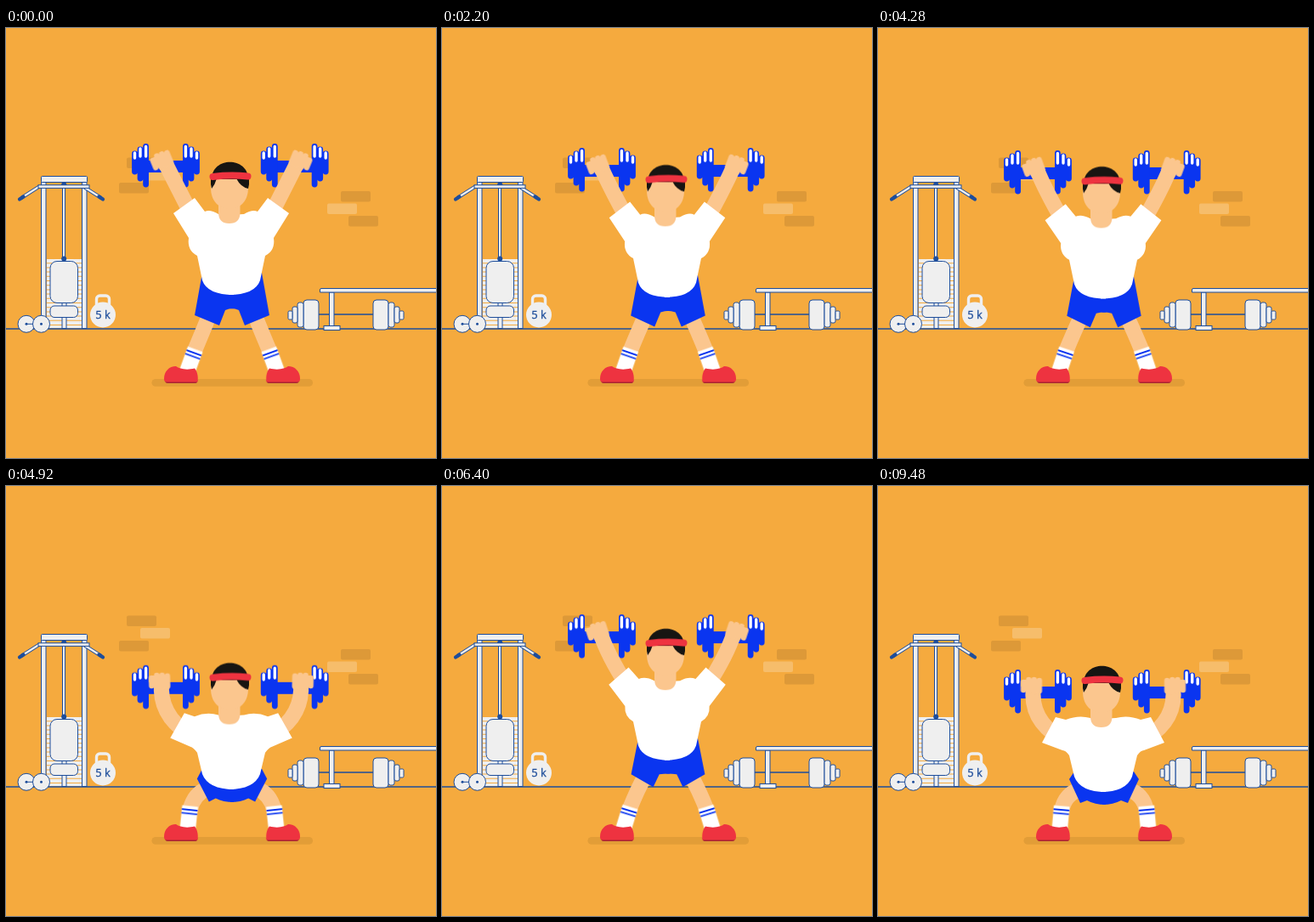
Write an HTML page without scripts that moves like this. It is 506 px wide and 506 px high and loops after 9960 ms.

```html
<!DOCTYPE html>
<html lang="en">
<head>
<meta charset="utf-8">
<title>Dumbbell squats</title>
<style>
  html, body { margin: 0; width: 100%; height: 100%; overflow: hidden; background: #f5aa3e; }
  svg { display: block; width: 100vw; height: 100vh; }

  .gear { fill: #efefef; stroke: #1d4d9b; stroke-width: 1; }
  .line { fill: none; stroke: #1d4d9b; stroke-width: 1.6; }
  .pale { fill: #efefef; }
  .navy { fill: #1d4d9b; }
  .dark { fill: #dd9938; }
  .light { fill: #f6bd6b; }
  .blue { fill: #0a35f0; }
  .skin { fill: #fbc68e; }
  .limb { fill: none; stroke: #fbc68e; stroke-width: 18; }
  .white { fill: #fff; }
  .red { fill: #ee3340; }
  .hair { fill: #171512; }
  .label { font: 13px "Open Sans", "Noto Sans", sans-serif; text-anchor: middle; stroke: #1d4d9b; stroke-width: .3; }

  /* Three and a half squats, then a rest at the bottom. */
  .move { animation: 9960ms cubic-bezier(.37, 0, .63, 1) infinite; }
  .lift { animation-name: lift; }
  .head { animation-name: head; }
  .fist { animation-name: fist; }
  .arm { animation-name: arm; }
  .shirt { animation-name: shirt; }
  .shorts { animation-name: shorts; }
  .leg { animation-name: leg; }
  .sock { animation-name: sock; transform-origin: 214px 402px; }

  @keyframes lift {
    0%, 20.44%, 40.88%, 61.33% { transform: translateY(0); }
    10.22%, 30.66%, 51.1%, 71.55%, 100% { transform: translateY(80px); }
  }
  @keyframes head {
    0%, 20.44%, 40.88%, 61.33% { transform: translateY(0); }
    10.22%, 30.66%, 51.1%, 71.55%, 100% { transform: translateY(54px); }
  }
  @keyframes fist {
    0%, 20.44%, 40.88%, 61.33% { transform: translate(183px, 156px) rotate(-22deg); }
    10.22%, 30.66%, 51.1%, 71.55%, 100% { transform: translate(180.5px, 235px) rotate(0deg); }
  }
  @keyframes arm {
    0%, 20.44%, 40.88%, 61.33% { d: path("M187 158Q199 182 219 221"); }
    10.22%, 30.66%, 51.1%, 71.55%, 100% { d: path("M183 236Q178 275 215 297"); }
  }
  @keyframes shirt {
    0%, 20.44%, 40.88%, 61.33% {
      d: path("M268 220L250 219Q240 213 234 216L222 200L197 218L215 247Q213 262 225 268L231 297Q237 314 268 314Z");
    }
    10.22%, 30.66%, 51.1%, 71.55%, 100% {
      d: path("M268 274L250 273Q236 269 221 275L209 272L193 302L217 311Q221 311 225 317L231 342Q238 360 268 360Z");
    }
  }
  @keyframes shorts {
    0%, 20.44%, 40.88%, 61.33% { d: path("M268 290L231 288L222 338L251 350L258 332Q262 330 268 330Z"); }
    10.22%, 30.66%, 51.1%, 71.55%, 100% { d: path("M268 340L231 336L225 345L238 373L246 370Q255 375 268 375Z"); }
  }
  @keyframes leg {
    0%, 20.44%, 40.88%, 61.33% { d: path("M240 336Q232 356 221 382"); }
    10.22%, 30.66%, 51.1%, 71.55%, 100% { d: path("M238 357Q220 362 216 382"); }
  }
  @keyframes sock {
    0%, 20.44%, 40.88%, 61.33% { transform: rotate(20deg); }
    10.22%, 30.66%, 51.1%, 71.55%, 100% { transform: rotate(5deg); }
  }
</style>
</head>
<body>
<svg viewBox="0 0 506 506">
  <defs>
    <rect id="brick" width="35" height="12.5" rx="2"/>

    <g id="plates">
      <path d="M151.5 148V169M158 143V177M164.6 139.5V184" stroke="#0a35f0" stroke-width="6.8" stroke-linecap="round"/>
      <path d="M151.5 147V153M158 142V151M164.6 139.5V151" stroke="#fff" stroke-width="3.4" stroke-linecap="round"/>
    </g>
    <g id="dumbbell">
      <rect class="blue" x="165" y="156" width="46" height="14"/>
      <use href="#plates"/>
      <use href="#plates" transform="translate(376) scale(-1 1)"/>
    </g>

    <g id="hand">
      <rect class="skin" x="-9" y="-7" width="20" height="13"/>
      <path d="M-9.4-4V5M-3.1-7V7M3.2-7V7M9.4-6V6" stroke="#fbc68e" stroke-width="6.4" stroke-linecap="round"/>
    </g>
    <g id="stocking">
      <rect class="white" x="204.7" y="376.5" width="18.6" height="28"/>
      <path d="M204.7 381H223.3M204.7 385.3H223.3" stroke="#0a35f0" stroke-width="1.8"/>
    </g>
    <g id="shoe">
      <path fill="#a92532" d="M187 414H225.3Q225.5 418 223 418H190Q187 418 187 414Z"/>
      <path class="red" d="M186 413C186 404 192 398 200 398C204 401 212 403 222 400.5C225 404 226.5 410 225.5 416.5H189Q186 416.5 186 413Z"/>
    </g>

    <g id="weights">
      <rect x="350" y="320" width="18" height="35" rx="4"/>
      <rect x="343" y="323" width="7" height="29" rx="2.5"/>
      <rect x="337" y="328" width="6" height="19" rx="2"/>
      <rect x="332" y="333" width="5" height="10" rx="1.5"/>
    </g>

    <g id="handle">
      <path d="M40 186L18 200" stroke="#1d4d9b" stroke-width="4.2"/>
      <path d="M40 186L21 198" stroke="#efefef" stroke-width="2.4"/>
      <path d="M20.5 198.5L16 201.5" stroke="#1d4d9b" stroke-width="4.2" stroke-linecap="round"/>
    </g>
  </defs>

  <rect width="506" height="506" fill="#f5aa3e"/>

  <g class="dark">
    <use href="#brick" x="142" y="152.5"/>
    <use href="#brick" x="133" y="182"/>
    <use href="#brick" x="394" y="192"/>
    <use href="#brick" x="403" y="221"/>
  </g>
  <g class="light">
    <use href="#brick" x="158" y="167"/>
    <use href="#brick" x="378" y="206.5"/>
  </g>

  <path class="line" d="M0 354H506"/>

  <!-- Pulldown machine -->
  <path d="M68.5 272V353" stroke="#efefef" stroke-width="41" stroke-dasharray="4.2 1"/>
  <g class="gear">
    <rect x="41.5" y="181" width="5.5" height="172.5"/>
    <rect x="89.5" y="181" width="5.5" height="172.5"/>
    <rect x="41.5" y="174.5" width="54" height="7" rx="1"/>
    <rect x="66.5" y="184" width="3" height="88"/>
    <use href="#handle"/>
    <use href="#handle" transform="translate(130) scale(-1 1)"/>
    <rect x="38" y="184.8" width="60" height="3.6"/>
    <rect x="66" y="323" width="5" height="30.5"/>
    <rect x="52" y="274.5" width="32.5" height="49" rx="8"/>
    <rect x="52" y="327" width="32.5" height="13.5" rx="5"/>
  </g>
  <g class="navy">
    <path d="M65 184.8A3.2 3.2 0 0 1 71.4 184.8Z"/>
    <circle cx="68.2" cy="271.5" r="3"/>
  </g>

  <!-- Small weights and kettlebell -->
  <g class="gear">
    <circle cx="24" cy="348.3" r="10"/>
    <circle cx="41.5" cy="348.3" r="10"/>
    <path d="M24 348.3H32"/>
  </g>
  <g class="navy">
    <circle cx="24" cy="348.3" r="1.5"/>
    <circle cx="41.5" cy="348.3" r="1.5"/>
  </g>
  <rect x="106.5" y="315" width="15" height="16" rx="4" fill="none" stroke="#efefef" stroke-width="3.4"/>
  <circle class="pale" cx="114" cy="337.5" r="15"/>
  <text class="label navy" x="114" y="342.3">5 k</text>

  <!-- Barbell and bench -->
  <path class="line" d="M368 337H432"/>
  <g class="gear">
    <use href="#weights"/>
    <use href="#weights" transform="translate(800) scale(-1 1)"/>
    <rect x="380.5" y="311" width="5.5" height="39.5"/>
    <rect x="374" y="350.5" width="19" height="5"/>
    <path d="M371 306.5H510V311H369.5V308Q369.5 306.5 371 306.5Z"/>
  </g>

  <!-- Athlete: each side is drawn as a left half, the right one mirrored -->
  <rect x="171.5" y="413" width="189.5" height="8.8" rx="4.4" fill="#e29d37"/>
  <g>
    <path class="move leg limb"/>
    <g class="move sock"><use href="#stocking"/></g>
    <use href="#shoe"/>
    <path class="move shorts blue"/>
  </g>
  <g transform="translate(532) scale(-1 1)">
    <path class="move leg limb"/>
    <g class="move sock"><use href="#stocking"/></g>
    <use href="#shoe"/>
    <path class="move shorts blue"/>
  </g>
  <g class="move lift">
    <use href="#dumbbell"/>
    <use href="#dumbbell" x="151.7"/>
  </g>
  <g>
    <path class="move arm limb"/>
    <g class="move fist"><use href="#hand"/></g>
    <path class="move shirt white"/>
  </g>
  <g transform="translate(530) scale(-1 1)">
    <path class="move arm limb"/>
    <g class="move fist"><use href="#hand"/></g>
    <path class="move shirt white"/>
  </g>
  <g class="move head">
    <path class="skin" d="M250 200H275.5V217Q275.5 230 262.7 230Q250 230 250 217Z"/>
    <path class="skin" d="M241 176H285V188C285 204 275 213 263 213C251 213 241 204 241 188Z"/>
    <path class="hair" d="M242 178C242 151 285 151 285 178Z"/>
    <path class="hair" d="M241 177H248Q246 184 242 189Q240.5 184 241 177ZM271 177H286Q286.5 184 285 189Q276 187 271 177Z"/>
    <path d="M243.5 175Q264 172.5 284.5 174.5" fill="none" stroke="#ee3340" stroke-width="8" stroke-linecap="round"/>
  </g>
</svg>
</body>
</html>
```
